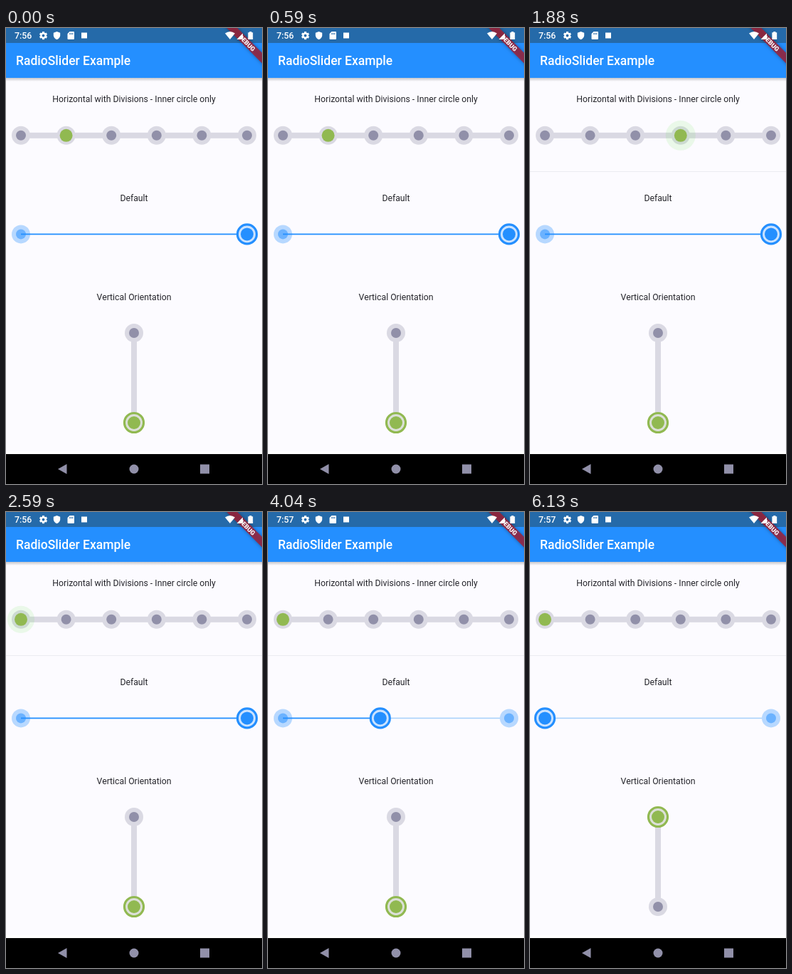
Recreate the animation shown at these times as an HTML page with a canvas. Size 360 px wide and 640 px high, loop 6210 ms.

```html
<!DOCTYPE html>
<html lang="en">
<head>
<meta charset="utf-8">
<title>RadioSlider Example</title>
<style>
html, body { margin: 0; width: 100%; height: 100%; overflow: hidden; background: #fcfbff; }
canvas { display: block; width: 360px; height: 640px; }
</style>
</head>
<body>
<canvas id="stage"></canvas>
<script>
const LOOP = 6210, MOVE = 75, GROW = 100, HOLD = 400;
const BLUE = '#248fff', PALE_BLUE = '#b7d8ff', GREEN = '#91b951';
const GREY = '#dad9e3', DOT = '#9190a9';
const canvas = document.getElementById('stage');
const c = canvas.getContext('2d');
const dpr = window.devicePixelRatio || 1;
canvas.width = 360 * dpr;
canvas.height = 640 * dpr;

// Each tap: [time, new position]
const steps = [[760, 2], [1660, 3], [2500, 0]];
const blueTaps = [[4000, 0]];
const greenTaps = [[5520, 1]];

const clamp = v => Math.max(0, Math.min(1, v));
const ease = v => v * v * (3 - 2 * v);

function position(start, taps, t) {
  return taps.reduce((p, [at, to]) => p + (to - p) * ease(clamp((t - at) / MOVE)), start);
}

function halo(taps, t) {
  return Math.max(...taps.map(([at]) =>
    Math.min(clamp((t - at) / GROW), clamp((at + HOLD + GROW - t) / GROW))));
}

function rect(x, y, w, h, fill) {
  c.fillStyle = fill;
  c.fillRect(x, y, w, h);
}

function disc(x, y, r, fill) {
  c.fillStyle = fill;
  c.beginPath();
  c.arc(x, y, r, 0, 7);
  c.fill();
}

function shape(path, fill) {
  c.fillStyle = fill;
  c.fill(new Path2D(path), 'evenodd');
}

function text(str, x, y, font, fill, align = 'left') {
  c.font = font + ' Roboto, sans-serif';
  c.textAlign = align;
  c.fillStyle = fill;
  c.fillText(str, x, y);
}

function radio(x, y, outer = GREY, inner = DOT) {
  disc(x, y, 13, outer);
  disc(x, y, 7, inner);
}

function overlay(x, y, amount, rgb) {
  if (amount > 0) disc(x, y, 21 * amount, `rgba(${rgb},.13)`);
}

function ringThumb(x, y, color, gap) {
  disc(x, y, 12.5, gap);
  c.strokeStyle = color;
  c.lineWidth = 3.2;
  c.beginPath();
  c.arc(x, y, 13.5, 0, 7);
  c.stroke();
  disc(x, y, 9, color);
}

function banner() {
  c.save();
  c.translate(360, 0);
  c.rotate(Math.PI / 4);
  c.shadowColor = 'rgba(0,0,0,.45)';
  c.shadowBlur = 5 * dpr;
  rect(-50, 24.5, 100, 10.5, 'rgba(166,30,52,.8)');
  c.shadowBlur = 0;
  text('DEBUG', 0, 33, '900 8.9px', '#fff', 'center');
  c.restore();
}

function gear(x, y) {
  c.save();
  c.translate(x, y);
  for (let i = 0; i < 6; i++) {
    rect(-1.5, -5.6, 3, 3.2, '#fff');
    c.rotate(Math.PI / 3);
  }
  c.strokeStyle = '#fff';
  c.lineWidth = 2.4;
  c.beginPath();
  c.arc(0, 0, 3.1, 0, 7);
  c.stroke();
  c.restore();
}

function statusBar(t) {
  text(t < 2630 ? '7:56' : '7:57', 12, 15.2, '500 12.4px', '#fff');
  gear(52.5, 10.6);
  shape('M71.5 5L76.2 6.8V10.2Q76 14.4 71.5 16.2Q67 14.4 66.8 10.2V6.8Z', '#fff');
  shape('M89.5 5H95Q96 5 96 6V15Q96 16 95 16H87.5Q86.5 16 86.5 15V8Z' +
    'M89.3 7V9.3H90.3V7ZM91.3 7V9.3H92.3V7ZM93.3 7V9.3H94.3V7Z', '#fff');
  rect(106, 6.5, 8, 8, '#fff');
  shape('M308 7.6Q315 2.4 322 7.6L315 16Z', '#fff');
  shape('M333 7.5V16H324.5Z', '#fff');
  shape('M342.3 5H345.3V6.2H347.2V16H340.4V6.2H342.3Z', '#fff');
}

function chrome(t) {
  const shade = c.createLinearGradient(0, 70, 0, 75);
  shade.addColorStop(0, '#c6c6ca');
  shade.addColorStop(1, '#fcfbff');
  rect(0, 70, 360, 5, shade);
  rect(0, 0, 360, 70, BLUE);
  rect(0, 0, 360, 21, '#256aa9');
  text('RadioSlider Example', 14, 52, '500 17.5px', '#fff');
  banner();
  statusBar(t);
  rect(0, 594, 360, 4, '#fff');
  rect(0, 598, 360, 42, '#000');
  shape('M73 619L85.5 612V626Z', DOT);
  disc(180, 619, 6.5, DOT);
  rect(273, 612.5, 13, 13, DOT);
}

function label(str, y) {
  text(str, 180, y, '12.25px', '#25252b', 'center');
}

function divided(t) {
  const at = i => 21 + i * 63.6, y = 150.8;
  const x = at(position(1, steps, t));
  rect(21, y - 4, 318, 8, GREY);
  for (let i = 0; i < 6; i++) radio(at(i), y);
  overlay(x, y, halo(steps, t), '110,220,90');
  disc(x, y, 9, GREEN);
}

function plain(t) {
  const y = 289.4, x = 21 + 318 * position(1, blueTaps, t);
  rect(x, y - 0.8, 339 - x, 1.6, '#a9d1fb');
  radio(21, y, PALE_BLUE, '#6bb2ff');
  radio(339, y, PALE_BLUE, '#6bb2ff');
  rect(21, y - 0.9, x - 21, 1.8, BLUE);
  overlay(x, y, halo(blueTaps, t), '36,143,255');
  ringThumb(x, y, BLUE, '#cbe3ff');
}

function vertical(t) {
  const x = 180, y = 554 - 126 * position(0, greenTaps, t);
  rect(x - 4, 428, 8, 126, GREY);
  radio(x, 428);
  radio(x, 554);
  overlay(x, y, halo(greenTaps, t), '110,220,90');
  ringThumb(x, y, GREEN, '#dce0d8');
}

function draw(now) {
  const t = now % LOOP;
  c.setTransform(dpr, 0, 0, dpr, 0, 0);
  rect(0, 0, 360, 640, '#fcfbff');
  label('Horizontal with Divisions - Inner circle only', 104.3);
  label('Default', 243);
  label('Vertical Orientation', 381.7);
  if (t > 1000) rect(0, 201, 360, 1, '#ebebf1');
  divided(t);
  plain(t);
  vertical(t);
  chrome(t);
}

const begin = performance.now();
function tick() {
  draw(performance.now() - begin);
  requestAnimationFrame(tick);
}
tick();
</script>
</body>
</html>
```
